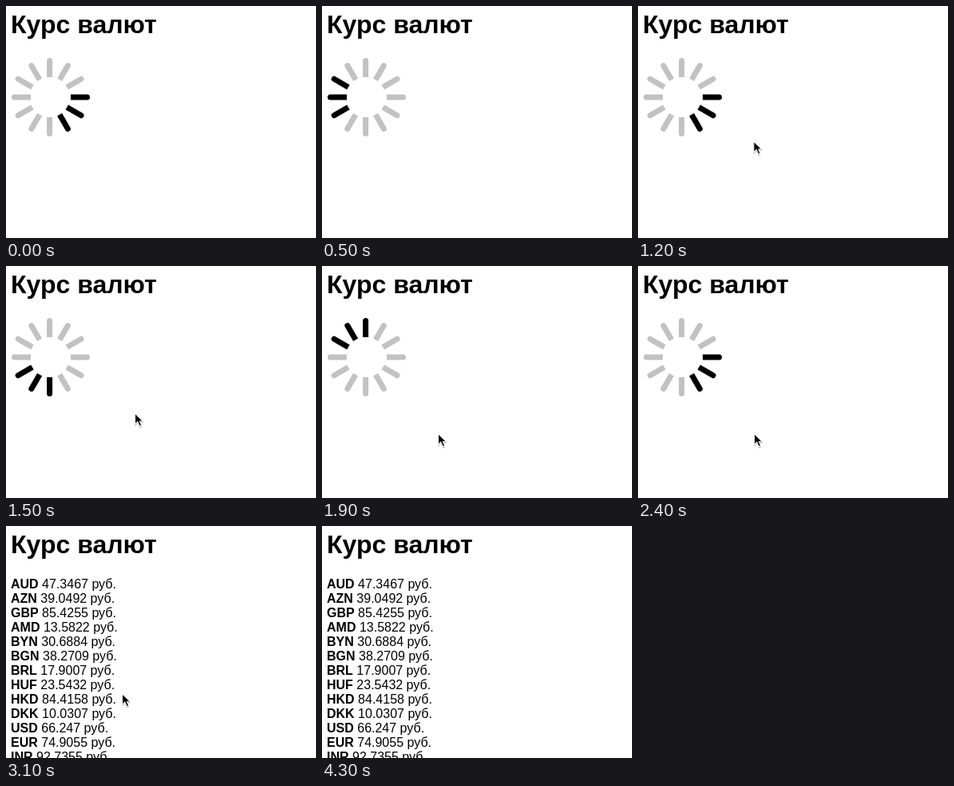
These frames come from a looping animation (388x290 px, 5300 ms). An HTML page:

```html
<!DOCTYPE html>
<html lang="ru">
<head>
<meta charset="utf-8">
<title>Курс валют</title>
<style>
  html, body { margin: 0; width: 100%; height: 100%; overflow: hidden; background: #fff; }
  svg { display: block; width: 388px; height: 290px; }
  text { font: 16px "Liberation Sans", Arial, sans-serif; fill: #000; white-space: pre; }
  .title { font-size: 32px; font-weight: bold; }
  .code { font-weight: bold; }
  .spoke { fill: #c2c2c2; }
  .spoke.lit { fill: #000; }
  #cursor { filter: drop-shadow(0 1px 0.7px rgba(0, 0, 0, 0.35)); }
</style>
</head>
<body>
<svg viewBox="0 0 388 290">
  <text class="title" x="6" y="34">Курс валют</text>
  <g id="spinner"></g>
  <g id="rates"></g>
  <g id="cursor">
    <path fill="#fff" d="M0 0V16L3.7 12.5L6.1 18.2L9.1 16.7L6.8 11.6H11.6Z"/>
    <path d="M1 2.4V13.6L4 10.7L6.5 16.6L8 15.9L5.6 10.6H9.2Z"/>
  </g>
</svg>
<script>
const LOOP = 5300, TICK = 100, LOADED = 31;
const SPOKES = 12, LIT = 3;
const rates = {
  AUD: "47.3467", AZN: "39.0492", GBP: "85.4255", AMD: "13.5822", BYN: "30.6884",
  BGN: "38.2709", BRL: "17.9007", HUF: "23.5432", HKD: "84.4158", DKK: "10.0307",
  USD: "66.247", EUR: "74.9055", INR: "92.7355"
};
// Cursor tip by the tick at which it gets there; null hides it.
const cursorStops = [
  [0, null], [11, [124, 112]], [12, [144.4, 168]], [13, [156, 180]], [14, [161, 183]],
  [16, [156, 195]], [17, [148, 206]], [18, [145, 208.5]],
  [41, [132, 125]], [42, [107.4, 25.5]], [43, null]
];

const byId = id => document.getElementById(id);
const spinner = byId("spinner"), list = byId("rates"), cursor = byId("cursor");

function add(parent, tag, attrs, text = "") {
  const node = document.createElementNS("http://www.w3.org/2000/svg", tag);
  for (const key in attrs) node.setAttribute(key, attrs[key]);
  node.textContent = text;
  return parent.appendChild(node);
}

// Flat inner end, round outer end; the horizontal pair sits slightly to the right.
const spokes = Array.from({ length: SPOKES }, (_, i) => add(spinner, "path", {
  class: "spoke",
  d: "M-3.5 -25V-45.5A3.5 3.5 0 0 1 3.5 -45.5V-25Z",
  transform: `translate(${i % 6 === 3 ? 56 : 54.6} 114) rotate(${i * 360 / SPOKES})`
}));

Object.entries(rates).forEach(([code, value], row) => {
  const line = add(list, "text", { x: 6, y: 78 + row * 18 });
  add(line, "tspan", { class: "code" }, code);
  line.append(` ${value} руб.`);
});

const show = (node, visible) => node.setAttribute("visibility", visible ? "visible" : "hidden");

function draw() {
  const tick = Math.floor(performance.now() % LOOP / TICK);
  const loaded = tick >= LOADED;
  show(spinner, !loaded);
  show(list, loaded);
  spokes.forEach((spoke, i) => {
    const behind = (i - tick - 3 + SPOKES * 4) % SPOKES;
    spoke.classList.toggle("lit", behind < LIT);
  });
  const tip = cursorStops.filter(([start]) => start <= tick).pop()[1];
  show(cursor, tip);
  if (tip) cursor.setAttribute("transform", `translate(${tip})`);
  requestAnimationFrame(draw);
}
draw();
</script>
</body>
</html>
```
